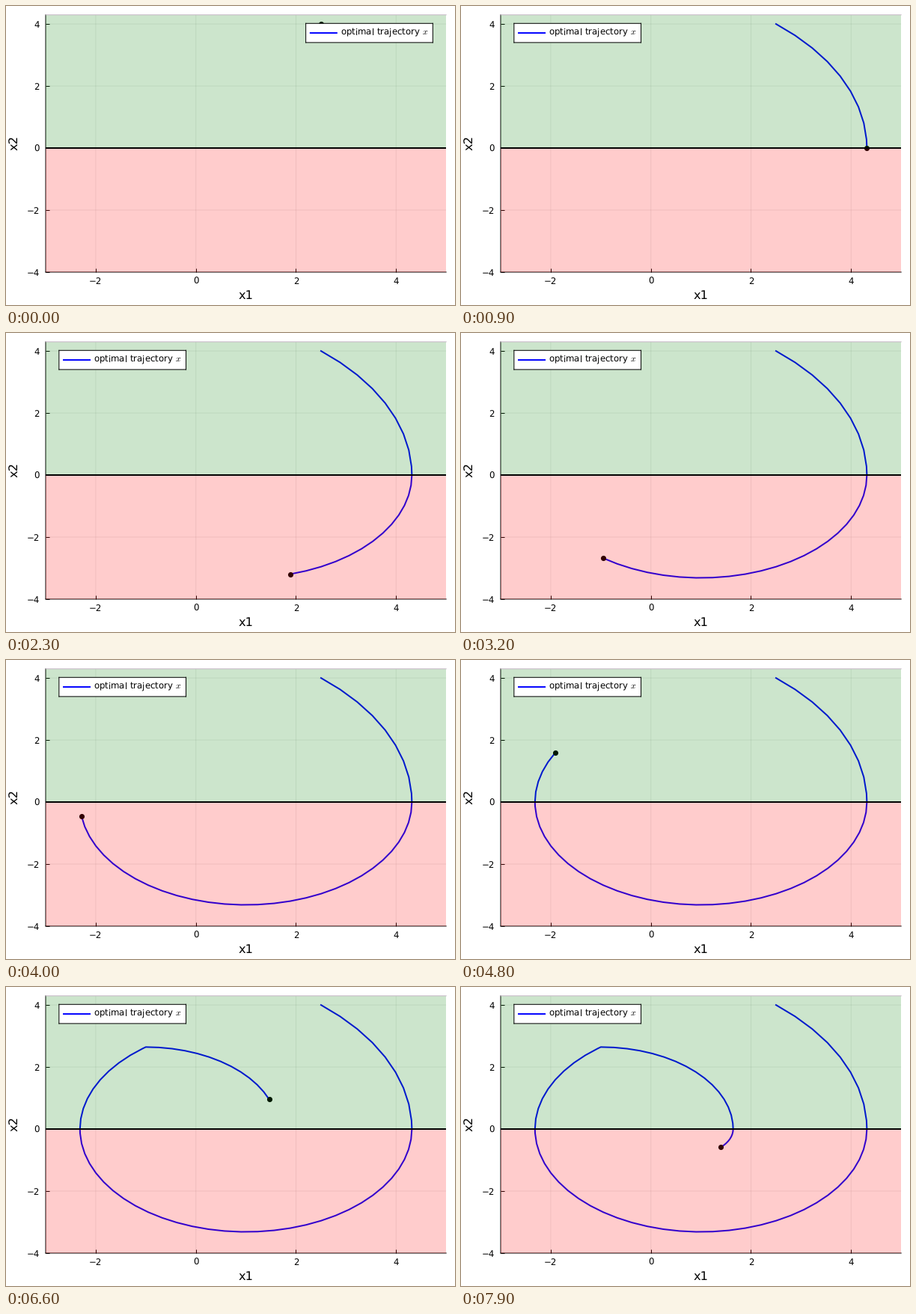
Animation, 600 px wide and 400 px high, one loop 8000 ms. Source, as a matplotlib script:

```python
import math

import matplotlib.pyplot as plt
import numpy as np
from matplotlib.animation import FuncAnimation

W, H = 600, 400
PX = 0.72  # points per pixel at 100 dpi
FRAMES, INTERVAL = 80, 100
STEP = 0.1
TOP = 4.295

LEFT_EDGE, RIGHT_EDGE, TOP_EDGE, BOTTOM_EDGE = 53, 588.19, 11.81, 356
LEGEND_W, LEGEND_H = 169.7, 25.6

plt.rcParams.update({
    "font.family": "DejaVu Sans",
    "mathtext.fontset": "cm",
    "font.size": 11.8 * PX,
    "text.hinting": "none",
    "axes.linewidth": PX,
    "path.snap": False,
})


def box(left, top, width, height):
    """Pixel rectangle, measured from the top left, as a figure rectangle."""
    return [left / W, 1 - (top + height) / H, width / W, height / H]


def legend_box(at_right):
    """The legend keeps a margin of 1/30 of the axes size."""
    margin = (RIGHT_EDGE - LEFT_EDGE) / 30
    left = RIGHT_EDGE - margin - LEGEND_W if at_right else LEFT_EDGE + margin
    top = TOP_EDGE + (BOTTOM_EDGE - TOP_EDGE) / 30
    return box(left, top, LEGEND_W, LEGEND_H)


def arc(center, start, duration):
    """Clockwise motion of an oscillator around (center, 0)."""
    t = np.append(np.arange(0, duration, STEP), duration)
    dx, dy = start[0] - center, start[1]
    radius, angle = math.hypot(dx, dy), math.atan2(dy, dx) - t
    return np.column_stack([center + radius * np.cos(angle), radius * np.sin(angle)])


def trajectory():
    start = (2.5, 4)
    arcs = [arc(-1, start, math.atan2(4, 3.5))]
    arcs.append(arc(1, arcs[-1][-1], math.pi))
    radius = 1 - arcs[-1][-1, 0]
    arcs.append(arc(1, arcs[-1][-1], math.acos(2 / radius)))
    arcs.append(arc(-1, arcs[-1][-1], math.pi / 2))
    last = arcs[-1][-1]
    arcs.append(arc(last[0] / 2, last, math.pi))  # half circle into the origin
    return np.vstack(arcs)[:FRAMES]


path = trajectory()

fig = plt.figure(figsize=(W / 100, H / 100), dpi=100, facecolor="white")
ax = fig.add_axes(box(LEFT_EDGE, TOP_EDGE, RIGHT_EDGE - LEFT_EDGE, BOTTOM_EDGE - TOP_EDGE))
ax.set(xlim=(-3, 5), ylim=(-4, TOP), xticks=range(-2, 5, 2), yticks=range(-4, 5, 2))
ax.spines[["top", "right"]].set_visible(False)
ax.spines[["left", "bottom"]].set_zorder(0.8)
ax.set_axisbelow(True)
ax.tick_params(direction="in", length=5 * PX, width=PX)
ax.tick_params(axis="x", pad=6.5 * PX)
ax.tick_params(axis="y", pad=8 * PX)
for tick in range(-2, 5, 2):
    ax.axvline(tick, color="black", alpha=0.07, lw=PX, zorder=0.4)
    ax.axhline(tick, color="black", alpha=0.07, lw=PX, zorder=0.4)

# Translucent regions lie over the curve and tint it.
curve, = ax.plot([], [], color="blue", lw=2 * PX, solid_joinstyle="round", zorder=1)
dot, = ax.plot([], [], "o", color="black", ms=7.1 * PX, mew=0, zorder=1.1)
ax.axhspan(0, TOP, color="green", alpha=0.2, lw=0, zorder=2)
ax.axhspan(-4, 0, color="red", alpha=0.2, lw=0, zorder=2)
ax.axhline(0, color="black", lw=2 * PX, zorder=3)
ax.axhline(TOP, color="#c4b6c4", lw=PX, zorder=3, clip_on=False)

fig.text(320.5 / W, 1 - 392 / H, "x1", size=16.2 * PX, ha="center", va="baseline")
fig.text(16 / W, 1 - 183 / H, "x2", size=16.2 * PX, ha="center", va="baseline",
         rotation=90, rotation_mode="anchor")

legend = fig.add_axes(legend_box(True), zorder=5, facecolor="white")
legend.set(xlim=(0, LEGEND_W), ylim=(LEGEND_H, 0), xticks=[], yticks=[])
legend.plot([5.2, 42.2], [LEGEND_H / 2] * 2, color="blue", lw=2 * PX,
            solid_capstyle="butt")
legend.text(46.5, 15.5, "optimal trajectory $x$", va="baseline")


def update(i):
    curve.set_data(path[:i + 1, 0], path[:i + 1, 1])
    dot.set_data(path[i:i + 1, 0], path[i:i + 1, 1])
    legend.set_position(legend_box(i == 0))
    return curve, dot, legend


anim = FuncAnimation(fig, update, frames=FRAMES, interval=INTERVAL,
                     repeat=True, repeat_delay=0, blit=False)
plt.show()
```
